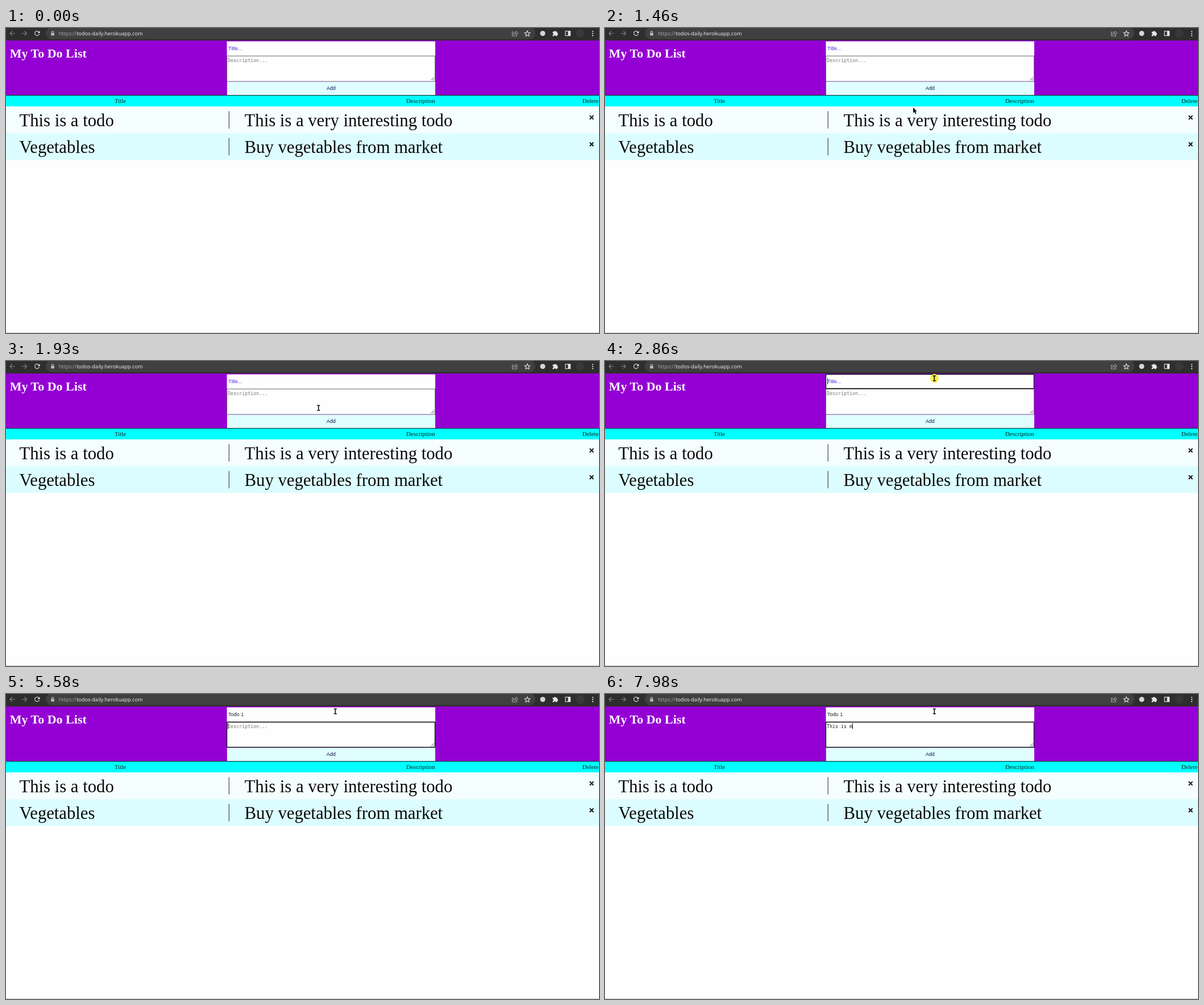
Animation of 1043 by 537 pixels, one loop 8000 ms. Source, as an HTML page:

```html
<!DOCTYPE html>
<html lang="en">
<head>
<meta charset="utf-8">
<title>My To Do List</title>
<style>
  html, body { margin: 0; width: 100%; height: 100%; overflow: hidden; background: #fefefe; }
  svg { display: block; }
  text { white-space: pre; }
  .ui { font: 9.05px "Liberation Sans", Arial, sans-serif; fill: #14144c; }
  .mono { font: 8.3px "DejaVu Sans Mono", monospace; }
  .url { font: 9.15px "Open Sans", sans-serif; fill: #f1f1f1; }
  .head { font: 10.86px "Liberation Serif", serif; fill: #10201f; }
  .row { font: 30.7px "Liberation Serif", serif; fill: #0a0a0a; }
  .title { font: bold 22px "Liberation Serif", serif; fill: #fff; }
  .line { fill: none; stroke: #d8d8d8; stroke-width: 1.2; }
  .dim { stroke: #808080; }
  .soft { stroke: #b8b8b8; }
  .ring { fill: none; stroke: #101010; stroke-width: 1.3; }
</style>
</head>
<body>
<svg width="1043" height="537" viewBox="0 0 1043 537">
  <!-- browser bar -->
  <rect width="1043" height="22" fill="#2e2e2e"/>
  <rect x="70" y="-1" width="861" height="20.5" rx="10" fill="#404040"/>
  <g class="line">
    <path class="dim" d="M15.5 9.5H7M11 5.5L7 9.5L11 13.5M28 9.5H36.5M32.5 5.5L36.5 9.5L32.5 13.5"/>
    <path d="M57.8 6.8A4 4 0 1 0 58.5 10.5"/>
    <path class="soft" d="M80.3 9V7.5A1.7 1.7 0 0 1 83.7 7.5V9"/>
    <path class="soft" d="M893 7H890.5V14H898.5V11.5M892.5 11.5C893 8.5 895 7.5 897 7.5V5.5L900.5 8.7L897 11.5V9.7C895 9.7 893.5 10.2 892.5 11.5Z" stroke-width=".9"/>
    <path d="M917 5L918.4 8.1L921.7 8.5L919.2 10.8L919.9 14.1L917 12.4L914.1 14.1L914.8 10.8L912.3 8.5L915.6 8.1Z"/>
    <rect x="984" y="5.5" width="8.5" height="8"/>
  </g>
  <g fill="#e8e8e8">
    <path d="M59.5 5V9H55.5Z"/>
    <rect x="79.2" y="8.7" width="5.6" height="4.5" rx=".6" fill="#bbb"/>
    <circle cx="944" cy="9.5" r="4.5" fill="#d5d5d5"/>
    <path d="M961.5 6.5H964A1.5 1.5 0 0 1 967 6.5H969.5V9A1.5 1.5 0 0 1 969.5 12V14.3H967A1.4 1.4 0 0 0 964 14.3H961.5V12A1.5 1.5 0 0 0 961.5 9Z"/>
    <rect x="988.5" y="5.5" width="4" height="8"/>
    <circle cx="1010" cy="9.5" r="7.5" fill="#383838"/>
    <circle cx="1032" cy="6" r="1.1"/><circle cx="1032" cy="9.7" r="1.1"/><circle cx="1032" cy="13.4" r="1.1"/>
  </g>
  <text class="url" x="93" y="13"><tspan fill="#a8a8a8">https://</tspan>todos-daily.herokuapp.com</text>

  <!-- page header and form -->
  <rect y="22" width="1043" height="97" fill="#9400d3"/>
  <text class="title" x="6.7" y="51.7">My To Do List</text>
  <rect x="388.5" y="23.5" width="366.5" height="25.5" fill="#fefefe"/>
  <rect x="388.5" y="49.2" width="366.2" height="44.8" fill="#fefefe" stroke="#555" stroke-width=".8"/>
  <path d="M747.5 92L753 86.5M750.5 92L753 89.5" stroke="#444" stroke-width=".9"/>
  <rect x="388.8" y="94.5" width="366.2" height="24" fill="#e0fdff"/>
  <text class="ui" x="571.7" y="109" text-anchor="middle">Add</text>
  <rect id="addRing" class="ring" x="389.3" y="94.8" width="365.3" height="23.2"/>
  <text id="titleText" class="ui" x="391" y="39"></text>
  <text id="descText" class="mono" x="390" y="59.5"></text>
  <rect id="titleRing" class="ring" x="388.5" y="23.5" width="366" height="25" rx="1"/>
  <rect id="descRing" class="ring" x="388.5" y="49.5" width="366" height="44.2" rx="1"/>
  <rect id="caret" width="1" height="10.5" fill="#111"/>

  <!-- list -->
  <rect y="118.5" width="1043" height="19.5" fill="#0ff"/>
  <path d="M0 118.5H1043" stroke="#102020"/>
  <g class="head">
    <text x="191" y="131.7">Title</text>
    <text x="704" y="131.7">Description</text>
    <text x="1013.7" y="131.7">Delete</text>
  </g>
  <g id="rows"></g>
  <path d="M0 536.5H1043" stroke="#c8c8c8"/>

  <!-- pointer -->
  <circle id="click" cx="579.5" cy="30.5" r="7.7" fill="#f3ec3a" opacity=".9"/>
  <path id="arrow" d="M0 0V9.6L2.2 7.7L3.9 11.4L5.6 10.6L4 7.1H6.7Z" fill="#0a0a0a"/>
  <path id="beam" d="M-2.5 -4.3H2.5M-2.5 4.3H2.5M0 -4.3V4.3" stroke="#0a0a0a" stroke-width="1.6"/>
</svg>
<script>
const LOOP = 8000, CLICK = 2800, TAB = 5580, BLINK = 530;
const $ = id => document.getElementById(id);
const show = (id, on) => $(id).setAttribute('visibility', on ? 'visible' : 'hidden');

const todos = [
  ['This is a todo', 'This is a very interesting todo', '#f5feff'],
  ['Vegetables', 'Buy vegetables from market', '#dcfdff'],
];
$('rows').innerHTML = todos.map(([title, text, color], i) => `
  <g transform="translate(0 ${138 + 47.2 * i})">
    <rect width="1043" height="47.2" fill="${color}"/>
    <text class="row" x="23.5" y="34.7">${title}</text>
    <path d="M392.2 8.5V39" stroke="#222"/>
    <text class="row" x="419.6" y="34.7">${text}</text>
    <path d="M1026.7 16.2L1033.3 22.8M1033.3 16.2L1026.7 22.8" stroke="#000" stroke-width="1.8"/>
  </g>`).join('');

// Pointer stops: time, x, y
const path = [
  [180, 660, 508], [690, 608.5, 112], [900, 604, 80], [1260, 604, 80], [1460, 542, 140],
  [1640, 524, 212], [1930, 549.7, 82.5], [2130, 556, 79], [2600, 579.3, 30.5], [LOOP, 579.3, 30.5],
];

// Typing bursts: start time, time per key
const typing = (text, start, gap = 0) => [...text].map((char, i) => ({ char, at: start + i * gap }));
const titleKeys = [...typing('Todo ', 3790, 165), ...typing('1', 5190)];
const descKeys = [...typing('This is ', 6330, 94), ...typing('m', 7980)];
const inputTimes = [CLICK, TAB, ...[...titleKeys, ...descKeys].map(key => key.at)];

function pointerAt(t) {
  const next = path.findIndex(stop => stop[0] > t);
  const [t0, x0, y0] = path[next - 1], [t1, x1, y1] = path[next];
  const p = (t - t0) / (t1 - t0), eased = p * p * (3 - 2 * p);
  return [x0 + (x1 - x0) * eased, y0 + (y1 - y0) * eased];
}

function drawPointer(t) {
  const visible = t >= path[0][0];
  const [x, y] = visible ? pointerAt(t) : [0, 0];
  const inField = visible && y < 94;
  $(inField ? 'beam' : 'arrow').setAttribute('transform', `translate(${x} ${y})`);
  show('beam', inField);
  show('arrow', visible && !inField);
  show('addRing', visible && y >= 94 && y < 118.5);
  show('click', t >= CLICK && t < 3060);
}

// Shows the typed text or the placeholder, and returns the typed width
function typeInto(id, keys, placeholder, hintColor, t) {
  const typed = keys.filter(key => t >= key.at).map(key => key.char).join('');
  const el = $(id);
  el.textContent = typed || placeholder;
  el.style.fill = typed ? '#1c1c30' : hintColor;
  return typed ? el.getComputedTextLength() : 0;
}

function draw(t) {
  const titleWidth = typeInto('titleText', titleKeys, 'Title...', '#4b2be0', t);
  const descWidth = typeInto('descText', descKeys, 'Description...', '#777', t);
  const inDesc = t >= TAB;
  const sinceInput = t - Math.max(...inputTimes.filter(at => at <= t));
  show('titleRing', t >= CLICK && !inDesc);
  show('descRing', inDesc);
  show('caret', t >= CLICK && sinceInput % (2 * BLINK) < BLINK);
  $('caret').setAttribute('x', inDesc ? 390 + descWidth : 391 + titleWidth);
  $('caret').setAttribute('y', inDesc ? 51.2 : 30.5);
  drawPointer(t);
}

function tick() {
  draw(performance.now() % LOOP);
  requestAnimationFrame(tick);
}
tick();
</script>
</body>
</html>
```
